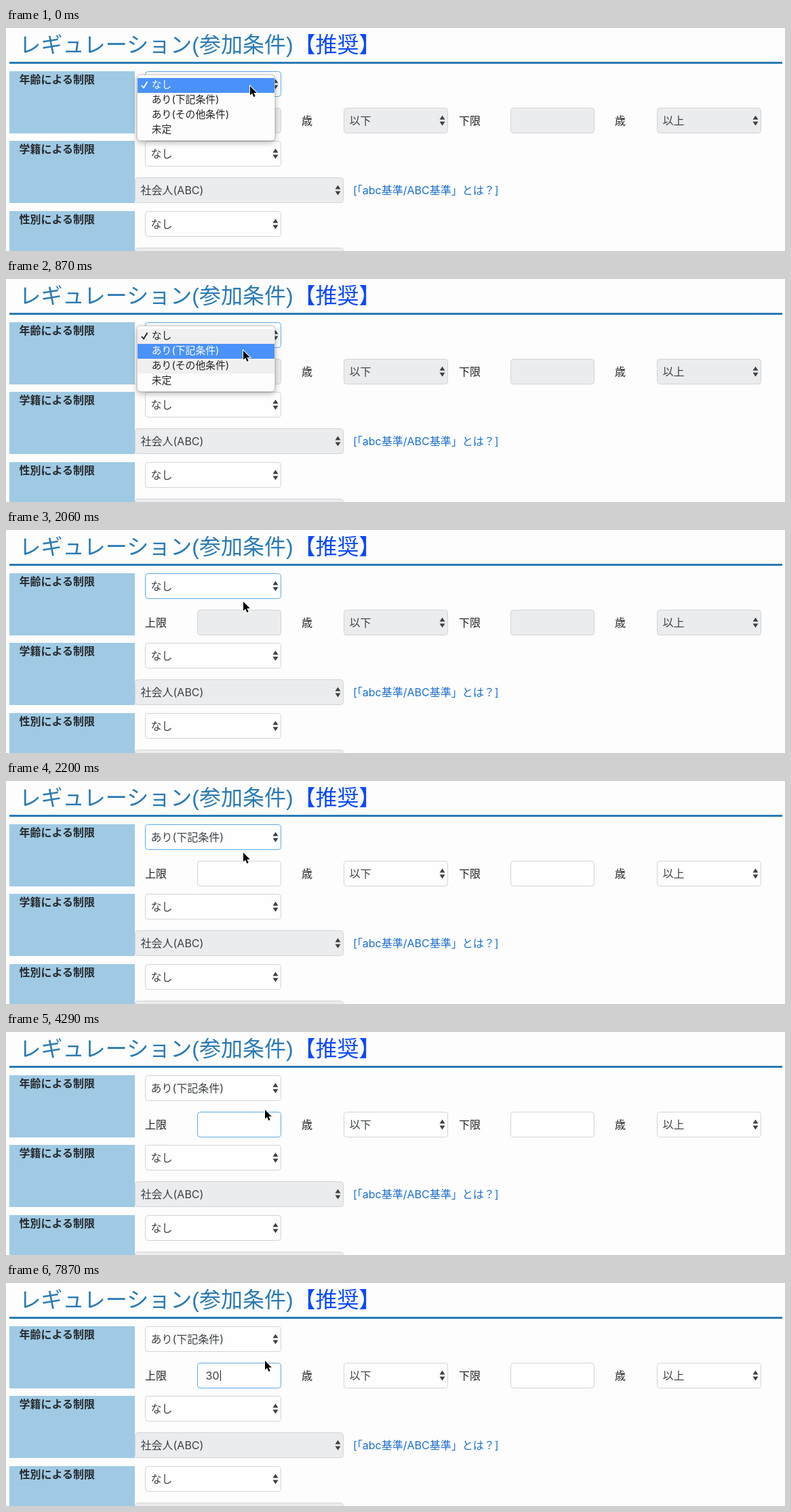
An HTML page that plays this animation: 1149 by 330 pixels, repeating every 8000 ms.

```html
<!DOCTYPE html>
<html lang="ja">
<head>
<meta charset="utf-8">
<style>
  html, body { margin: 0; width: 100%; height: 100%; overflow: hidden; background: #fdfdfd; }
  svg { display: block; width: 1149px; height: 330px; }
  text { font: 16px Inter, "Noto Sans CJK JP", "Noto Sans CJK", sans-serif; fill: #222; white-space: pre; }
  .title { font: 32px "Liberation Sans", "Noto Sans CJK JP", "Noto Sans CJK", sans-serif; fill: #2a7ab5; }
  .mark { fill: #0a48ff; }
  .head { font-weight: 700; fill: #262a2e; }
  .value { fill: #3c4043; }
  .link { fill: #1c6fd0; }
  .item { font-size: 14.8px; }
  .panel { filter: drop-shadow(0 0 1px rgba(0,0,0,.4)) drop-shadow(0 3px 4px rgba(0,0,0,.28)); }
</style>
</head>
<body>
<svg id="stage" viewBox="0 0 1149 330"></svg>
<script>
const LOOP = 8000;
const MENU_FADE = 1770, MENU_FAINT = 1910, MENU_GONE = 2060;
const ENABLED = 2200, INPUT_FOCUS = 2940, TYPED = 7870;

// [time, x, y] of the pointer tip; each position holds until the next
const pointerStops = [
  [0, 360, 86], [290, 356, 90], [440, 351, 114], [580, 350, 121], [730, 349, 119],
  [870, 350, 106], [2500, 350, 110], [2650, 353, 128], [2940, 368, 129], [3090, 382, 115]
];
const caretToggles = [2940, 3390, 3840, 4290, 4890, 5340, 5790, 6380, 6830, 7270, 7870];
const changes = [...new Set([...pointerStops.map(p => p[0]), ...caretToggles,
  MENU_FADE, MENU_FAINT, MENU_GONE, ENABLED])];
const menuItems = ['なし', 'あり(下記条件)', 'あり(その他条件)', '未定'];

const rect = (x, y, w, h, fill, extra = '') =>
  `<rect x="${x}" y="${y}" width="${w}" height="${h}" fill="${fill}" ${extra}/>`;
const text = (x, y, string, cls = '', extra = '') =>
  `<text x="${x}" y="${y}" class="${cls}" ${extra}>${string}</text>`;

function field(x, y, w, { disabled, focus } = {}) {
  return rect(x + .5, y + .5, w - 1, 37, disabled ? '#ebecee' : '#fefefe',
    `rx="4" stroke="${focus ? '#5fa9ea' : '#d2d4d6'}"`);
}

function select(x, y, w, value, options) {
  const cx = x + w - 8.5;
  return field(x, y, w, options) + text(x + 8.5, y + 25, value, 'value') +
    `<path d="M${cx - 4} ${y + 17.5}h8l-4-6zM${cx - 4} ${y + 20.5}h8l-4 6z" fill="#3c4043"/>`;
}

function heading(y, h, label) {
  return rect(5, y, 185, h, '#a0cae4') + text(19.5, y + 17.5, label, 'head');
}

function menu(t) {
  const active = t < 440 ? 0 : t >= 580 && t < 870 ? 2 : 1;
  const rows = menuItems.map((label, i) => {
    const y = 74 + 22 * i, on = i === active;
    const shaded = t >= 440 && i < 3;
    const height = i === 2 && t < 580 ? 16 : 22;
    const band = on ? rect(194, y, 202, 22, '#4a92f9')
      : shaded ? rect(194, y, 202, height, '#f0f0f0') : '';
    const ink = on ? '#fff' : '#222';
    const check = i ? '' :
      `<path d="M200 85l3 3.5 5.5-9" fill="none" stroke="${ink}" stroke-width="1.9"/>`;
    return band + check + text(214.8, y + 14.5, label, 'item', `style="fill:${ink}"`);
  });
  const opacity = t < MENU_FADE ? 1 : t < MENU_FAINT ? .5 : .12;
  return `<g opacity="${opacity}">` +
    rect(193.5, 69.5, 203, 97, '#fdfdfd', 'rx="5" class="panel"') + rows.join('') + '</g>';
}

function pointer(t) {
  const [, x, y] = pointerStops.findLast(stop => stop[0] <= t);
  return `<path transform="translate(${x} ${y})" d="M0 0V13.6L3.1 10.7 5.4 16 7.7 15 5.4 9.9H9.8Z"
    stroke="#fff" stroke-width="2" paint-order="stroke"/>`;
}

function scene(t) {
  const disabled = t < ENABLED;
  const typed = t >= TYPED;
  const caretOn = caretToggles.filter(time => time <= t).length % 2;
  return text(19.5, 35.5, 'レギュレーション(参加条件)', 'title') +
    text(424.5, 35.5, '【推奨】', 'title mark') +
    rect(5, 50, 1140, 3, '#2a7ab5') +

    heading(64, 92, '年齢による制限') +
    select(205, 64, 201, menuItems[disabled ? 0 : 1], { focus: t < INPUT_FOCUS }) +
    text(205, 143, '上限') +
    field(282, 118, 124, { disabled, focus: t >= INPUT_FOCUS }) +
    text(436, 143, '歳') + select(498, 118, 154, '以下', { disabled }) +
    text(668, 143, '下限') + field(744, 118, 124, { disabled }) +
    text(898, 143, '歳') + select(960, 118, 154, '以上', { disabled }) +
    (typed ? text(294.5, 143, '30', 'value') : '') +
    (caretOn ? rect(typed ? 316 : 295, 129, 1, 16, '#222') : '') +

    heading(167, 92, '学籍による制限') +
    select(205, 167, 201, 'なし') +
    select(190, 221, 308, '社会人(ABC)', { disabled: true }) +
    text(512, 246, '[「abc基準/ABC基準」とは？]', 'link') +

    heading(271, 59, '性別による制限') +
    select(205, 271, 201, 'なし') +
    field(190, 325, 308, { disabled: true }) +

    (t < MENU_GONE ? menu(t) : '') + pointer(t);
}

const stage = document.getElementById('stage');
let shown = -1;
function tick() {
  const t = performance.now() % LOOP;
  const current = Math.max(...changes.filter(time => time <= t));
  if (current !== shown) stage.innerHTML = scene(shown = current);
  requestAnimationFrame(tick);
}
tick();
</script>
</body>
</html>
```
